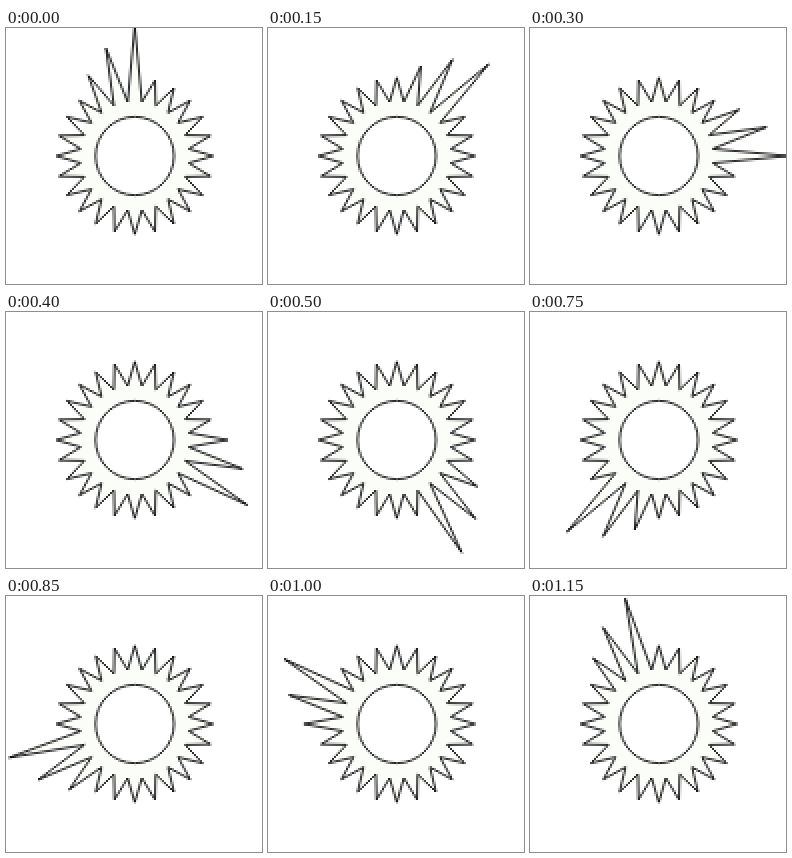
Write an HTML page with a canvas that moves like this. It is 256x256 px and loops after 1200 ms.

```html
<!DOCTYPE html>
<html>
<head>
<meta charset="utf-8">
<title>Spiky sun</title>
<style>
  html, body { margin: 0; height: 100%; overflow: hidden; background: #fff; }
  canvas { display: block; width: 100vw; height: 100vh; image-rendering: pixelated; }
</style>
</head>
<body>
<canvas id="stage" width="128" height="128"></canvas>
<script>
// Drawn at half size and doubled, which gives the coarse pixel edges.
const COUNT = 24, STEP_MS = 50;
const CX = 64.4, CY = 64, DISC = 19.6;
const VALLEY = 27.25, TIP = 39.2, PEAK = 65, FALL = 9.25;
const ctx = document.getElementById('stage').getContext('2d');
ctx.lineWidth = 0.85;
ctx.lineJoin = 'round';

// Position in ray units, clockwise from the top.
function lineTo(pos, radius) {
  const a = pos / COUNT * 2 * Math.PI;
  ctx.lineTo(CX + radius * Math.sin(a), CY - radius * Math.cos(a));
}

function paint(color) {
  ctx.fillStyle = color;
  ctx.fill();
  ctx.stroke();
}

function draw(lead) {
  ctx.clearRect(0, 0, 128, 128);
  ctx.beginPath();
  for (let i = 0; i < COUNT; i++) {
    const lag = (lead - i + COUNT) % COUNT;
    lineTo(i - 0.5, VALLEY);
    lineTo(i, Math.max(TIP, PEAK - FALL * lag));
  }
  ctx.closePath();
  paint('#fbfdf9');
  ctx.beginPath();
  ctx.arc(CX, CY, DISC, 0, 2 * Math.PI);
  paint('#fff');
}

const start = performance.now();
function tick() {
  const elapsed = performance.now() - start;
  draw(Math.floor(elapsed / STEP_MS) % COUNT);
  requestAnimationFrame(tick);
}
tick();
</script>
</body>
</html>
```
